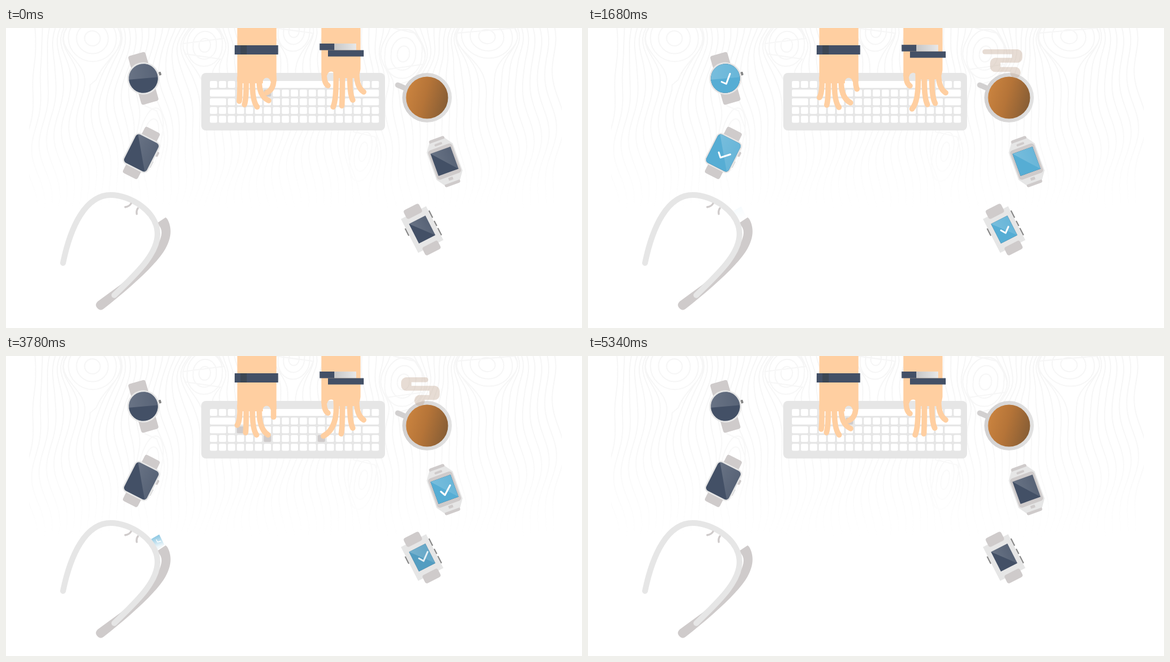
An HTML page that plays this animation: 1000 by 521 pixels, repeating every 5.37 s.

```html
<!DOCTYPE html>
<html lang="en">
<head>
<meta charset="utf-8">
<title>Desk with wearables</title>
<style>
  html, body { margin: 0; width: 100%; height: 100%; overflow: hidden; background: #fff; }
  svg { display: block; width: 100vw; height: 100vh; }
  .strap { fill: #cfcbcb; }
  .case { fill: #e6e6e6; }
  .dark { fill: #435066; }
  .blue { fill: #56add4; }
  .skin { fill: #ffcfa1; }
  .button { fill: #858585; }
  .finger { fill: none; stroke: #ffcfa1; stroke-width: 9.5; stroke-linecap: round; }
  .check { fill: none; stroke: #fff; stroke-width: 3; stroke-linecap: round; stroke-linejoin: round; }
</style>
</head>
<body>
<svg id="stage" viewBox="0 0 1000 521">
  <defs>
    <linearGradient id="coffee" x1="0" y1=".35" x2="1" y2=".65">
      <stop stop-color="#ca833f"/><stop offset=".45" stop-color="#b57438"/><stop offset="1" stop-color="#865d35"/>
    </linearGradient>
    <linearGradient id="rim">
      <stop stop-color="#d2d0d0"/><stop offset="1" stop-color="#e2e2e2"/>
    </linearGradient>
    <linearGradient id="silver">
      <stop stop-color="#c6c6c6"/><stop offset="1" stop-color="#e8e8e8"/>
    </linearGradient>
    <linearGradient id="gloss">
      <stop stop-color="#fff" stop-opacity=".2"/><stop offset="1" stop-color="#fff" stop-opacity=".11"/>
    </linearGradient>
    <linearGradient id="prism" x1=".3" y1="0" x2=".6" y2="1">
      <stop stop-color="#7cc0df"/><stop offset=".8" stop-color="#f0f7fa"/>
    </linearGradient>
    <linearGradient id="fadeDown" x2="0" y2="1">
      <stop stop-color="#fff"/><stop offset=".5" stop-color="#ccc"/><stop offset="1" stop-color="#000"/>
    </linearGradient>
    <mask id="grainMask" maskUnits="userSpaceOnUse" x="40" y="0" width="925" height="315">
      <rect x="40" width="925" height="315" fill="url(#fadeDown)"/>
    </mask>
  </defs>

  <g mask="url(#grainMask)"><path id="grain" fill="none" stroke="#f6f6f6" stroke-width="2"/></g>

  <g id="keyboard"><rect class="case" x="339" y="78" width="319" height="100" rx="8"/></g>

  <path d="M680 99L694 105" stroke="#d2d0d0" stroke-width="9" stroke-linecap="round"/>
  <circle cx="731" cy="121" r="43" fill="url(#rim)"/>
  <circle cx="731" cy="121" r="36.5" fill="url(#coffee)"/>
  <g id="steam" fill="#c5aa96" stroke="#c5aa96"></g>

  <g transform="translate(238.5 87.5) rotate(-16)">
    <rect class="strap" x="-15.5" y="-44" width="31" height="88" rx="4"/>
    <rect class="button" x="28" y="-3" width="4" height="6" rx="1"/>
    <circle class="case" r="28"/>
    <circle class="dark" r="25.3"/><circle class="blue on" r="25.3"/>
    <path d="M-25.3 0A25.3 25.3 0 0 1 25.3 0Z" fill="url(#gloss)" transform="rotate(11)"/>
  </g>

  <g transform="translate(235 217) rotate(27)">
    <rect class="strap" x="-14.5" y="-45" width="29" height="90" rx="4"/>
    <rect class="strap" x="23" y="-15" width="5" height="9" rx="2"/>
    <rect x="24" y="4" width="2" height="12" fill="#dcdcdc"/>
    <rect class="case" x="-24.5" y="-30" width="49" height="60" rx="9"/>
    <rect class="dark" x="-22" y="-27.5" width="44" height="55" rx="6"/>
    <rect class="blue on" x="-22" y="-27.5" width="44" height="55" rx="6"/>
    <path d="M-20 -26.5L20 26.5L22 21V-21Q22 -27.5 16 -27.5H-16Z" fill="url(#gloss)"/>
  </g>

  <g transform="translate(722.5 350) rotate(-27)">
    <g class="button">
      <rect x="23.5" y="-24" width="3" height="14"/><rect x="23.5" y="-4" width="3" height="10"/>
      <rect x="23.5" y="10" width="3" height="14"/><rect x="-26.5" y="-15" width="3" height="14"/>
    </g>
    <rect class="case" x="-24.5" y="-33" width="49" height="66"/>
    <rect class="strap" x="-15" y="-44" width="30" height="17" rx="4"/>
    <rect class="strap" x="-15" y="28" width="30" height="16" rx="4"/>
    <rect class="dark" x="-16" y="-19" width="32" height="38"/>
    <rect class="blue on" x="-16" y="-19" width="32" height="38"/>
    <path d="M-16 -19L16 19V-19Z" fill="url(#gloss)"/>
  </g>

  <g transform="translate(761.5 232) rotate(-20)">
    <rect class="strap" x="-14" y="-43" width="28" height="86" rx="3"/>
    <path class="case" d="M-15 -38H15L24 -25V25L15 38H-15L-24 25V-25Z"/>
    <rect class="strap" x="-22" y="-27" width="44" height="54" rx="5"/>
    <rect class="strap" x="-7" y="-34" width="14" height="4" rx="2"/>
    <rect class="strap" x="-4" y="29" width="8" height="5" rx="1"/>
    <rect class="dark" x="-18.5" y="-21" width="37" height="41"/>
    <rect class="blue on" x="-18.5" y="-21" width="37" height="41"/>
    <path d="M-18.5 -21L18.5 20V-21Z" fill="url(#gloss)"/>
  </g>

  <path class="on" d="M252 318L266 310L275 328L262 337Z" fill="url(#prism)"/>
  <path class="strap" d="M262 339L277 329Q280 330 283 338C288 352 286 366 277 383C262 410 215 452 169 488Q164 492 159 487Q153 481 159 475L200 445C240 410 268 380 270 357Q271 347 262 339Z"/>
  <path d="M99 408C112 345 138 290 182 290C215 290 263 318 263 358C263 395 220 432 188 464" fill="none" stroke="#e6e6e6" stroke-width="10" stroke-linecap="round"/>
  <path d="M217 305Q214 310 207 311M229 313Q226 317 227 323" fill="none" stroke="#cfcbcb" stroke-width="3.4" stroke-linecap="round"/>

  <path class="check" d="M232 93.5L240 97L246.500 79.500"/>
  <path class="check" d="M227 216L230 225L247 219.500"/>
  <path class="check" d="M717 351.500L725 356L732 340"/>
  <path class="check" d="M755 235.500L762 241.500L771 224.500"/>
  <path class="check" d="M261 319L263 323L269 321.500" style="stroke-width:1.3"/>

  <g id="leftFingers"></g>
  <g id="leftHand">
    <path class="skin" d="M401.500 -20V92Q402 96 407 96H446V93A6.500 6.500 0 0 1 459 93H469.500V-20Z"/>
    <rect class="dark" x="397" y="30" width="75.500" height="16"/>
    <rect x="407" y="30" width="11" height="16" fill="#3c4754"/>
  </g>
  <g id="rightFingers"></g>
  <g id="rightHand">
    <path class="skin" d="M547.500 -20V85H558A6.500 6.500 0 0 1 571 85V90H604L614 82L615.500 74V-20Z"/>
    <rect class="dark" x="544.500" y="30" width="26" height="11.500"/>
    <rect x="570" y="30" width="38" height="11.500" fill="url(#silver)"/>
    <rect class="dark" x="559" y="41.500" width="62" height="11"/>
  </g>
</svg>
<script>
const LOOP = 5370;
const $ = id => document.getElementById(id);
const clamp = v => Math.min(1, Math.max(0, v));
const ease = v => { v = clamp(v); return v * v * (3 - 2 * v); };
const ramp = (t, start, length) => ease((t - start) / length);
const mix = (a, b, k) => a + (b - a) * k;

function add(parent, tag, attrs) {
  const el = document.createElementNS('http://www.w3.org/2000/svg', tag);
  for (const name in attrs) el.setAttribute(name, attrs[name]);
  return parent.appendChild(el);
}

// Wood grain: wavy lines that part around a few knots, with rings inside each knot.
function drawGrain() {
  const knots = [[150, 18, 52, 50], [345, 30, 38, 42], [500, 5, 34, 40], [690, 45, 40, 48], [835, 15, 55, 46], [250, 195, 24, 60], [620, 215, 26, 55]];
  let d = '';
  for (let x0 = 45; x0 < 960; x0 += 13) {
    for (let y = 0; y <= 315; y += 9) {
      let x = x0 + 9 * Math.sin(y / 48 + x0 / 90) + 5 * Math.sin(y / 23 + x0 / 37);
      for (const [kx, ky, r, h] of knots) {
        const dx = x - kx, push = r * Math.exp(-(((y - ky) / h) ** 2));
        x = kx + Math.sign(dx || 1) * Math.sqrt(dx * dx + push * push * Math.exp(-Math.abs(dx) / 90));
      }
      d += (y ? 'L' : 'M') + x.toFixed(1) + ' ' + y;
    }
  }
  for (const [kx, ky, r, h] of knots)
    for (let s = 0.8; s > 0.15; s -= 0.27) {
      const rx = r * s, ry = h * s;
      d += `M${kx - rx} ${ky}a${rx} ${ry} 12 1 0 ${2 * rx} 0a${rx} ${ry} 12 1 0 ${-2 * rx} 0`;
    }
  $('grain').setAttribute('d', d);
}

const keys = {};
function drawKeys() {
  const ones = n => Array(n).fill(1);
  const rows = [[...ones(4), 9, ...ones(6)], [3, ...ones(13), 3], [2, ...ones(15), 2], ones(19), ones(19)];
  rows.forEach((spans, row) => {
    let col = 0;
    for (const span of spans) {
      keys[col + ',' + row] = add($('keyboard'), 'rect', {
        x: 354 + col * 15.6, y: 92 + row * 15.1, width: span * 15.6 - 3, height: 12, rx: 2
      });
      col += span;
    }
  });
}

// Each pose: vertical shift, pressed keys, then the five fingertips.
const hands = [
  {
    name: 'left', base: [[406, 86], [417, 86], [428, 86], [440, 86], [464.5, 84]],
    poses: [
      [0, ['6,1'], 405, 127, 414, 133, 436, 137, 456, 126, 453, 112],
      [0, ['3,2'], 403, 118, 410.500, 133, 436, 137, 456, 128, 464.500, 106],
      [0, ['3,2'], 402, 121, 414, 134, 436, 138, 456, 127, 468, 106],
      [6, [], 405, 133, 415, 138, 437, 147, 456, 138, 468, 112],
      [0, ['3,2', '6,3'], 401.500, 120, 416, 133, 435, 137, 455, 137, 464.500, 106],
      [0, ['5,1', '7,1'], 401.500, 129, 414, 133, 437, 122, 466, 122, 464.500, 106]
    ]
  },
  {
    name: 'right', base: [[552.5, 80], [573, 80], [584, 80], [597, 78], [609, 74]],
    poses: [
      [-3, [], 559, 100, 568, 137, 583, 135, 602, 125, 621, 111],
      [0, ['16,4', '17,2'], 559, 101, 567, 141, 583, 137, 606, 145, 625, 127],
      [0, ['15,2'], 559, 101, 567, 141, 592, 132, 603, 133, 621, 113],
      [-3, ['15,3'], 559, 98, 567, 138, 593, 139, 602, 125, 621, 111],
      [-3, ['12,3'], 559, 99, 551, 139, 582, 135, 602, 125, 621, 111],
      [0, ['16,4'], 559, 101, 567, 141, 582, 141, 606, 145, 621, 113]
    ]
  }
];

// Fixed beats, filled in with extra strokes at typing speed.
function typingBeats() {
  const main = [[0, 0], [1050, 1], [2340, 2], [3240, 3], [3780, 4], [4770, 5], [LOOP, 0]];
  const beats = [];
  main.slice(0, -1).forEach(([start, pose], i) => {
    const end = main[i + 1][0], count = Math.round((end - start) / 180);
    for (let k = 0; k < count; k++)
      beats.push([start + (end - start) * k / count, k ? (pose + k * 2 + i) % 6 : pose]);
  });
  return [...beats, [LOOP, 0]];
}
const beats = typingBeats();

function drawHands(t) {
  const i = beats.findIndex(b => b[0] > t) - 1;
  const [t0, p0] = beats[i], [t1, p1] = beats[i + 1];
  const phase = (t - t0) / (t1 - t0), k = ease((phase - 0.25) / 0.5);
  for (const key in keys) keys[key].style.fill = '#fff';
  for (const hand of hands) {
    const a = hand.poses[p0], b = hand.poses[p1];
    const shift = mix(a[0], b[0], k);
    $(hand.name + 'Hand').setAttribute('transform', `translate(0 ${shift})`);
    hand.fingers.forEach((finger, n) => {
      const [x, y0] = hand.base[n], y = y0 + shift;
      const tipX = mix(a[2 + n * 2], b[2 + n * 2], k), tipY = mix(a[3 + n * 2], b[3 + n * 2], k);
      finger.setAttribute('d', `M${x} ${y}Q${x - 0.17 * (tipX - x)} ${mix(y, tipY, 0.78)} ${tipX} ${tipY}`);
    });
    const pressed = phase < 0.32 ? a[1] : phase > 0.68 ? b[1] : [];
    for (const key of pressed) keys[key].style.fill = '#cfcbcb';
  }
}

const screens = document.querySelectorAll('.on');
const checks = document.querySelectorAll('.check');
function drawScreens(t) {
  screens.forEach((screen, i) => {
    const lit = ramp(t, 440 + i * 300, 250) * (1 - ramp(t, 3120 + i * 295, 270));
    const drawn = ramp(t, 950 + i * 270, 270);
    screen.style.opacity = lit;
    checks[i].style.opacity = drawn > 0.01 ? lit : 0;
    checks[i].style.strokeDashoffset = 1 - drawn;
  });
}

// Steam: three bars joined by thick bends; the second puff mirrors the first.
const bars = [41.3, 56, 72].map(y => add($('steam'), 'line', { y1: y, y2: y, 'stroke-width': 8.5, 'stroke-linecap': 'round' }));
const bends = [[37, 23.300], [51.800, 24.500], [67.800, 19]].map(([y, height]) => add($('steam'), 'rect', { y, height, width: 18, rx: 9, stroke: 'none' }));
function drawSteam(t) {
  const first = t < 2700, side = first ? 1 : -1;
  const k = first ? (t - 1050) / 1290 : (t - 3780) / 990;
  const edges = first
    ? [mix(698, 671, k), mix(760, 748, k), mix(702, 694, k), mix(752, 750, k)]
    : [mix(733, 725, k), mix(686, 678, k), mix(753, 756, k), mix(709, 703, k)];
  const facing = [-side, side, -side, side];
  const inner = edges.map((x, i) => x - facing[i] * (i ? 9 : 4.25));
  bars.forEach((bar, i) => {
    bar.setAttribute('x1', inner[i]);
    bar.setAttribute('x2', inner[i + 1]);
  });
  bends.forEach((bend, i) => bend.setAttribute('x', edges[i + 1] - (facing[i + 1] > 0 ? 18 : 0)));
  const shown = first
    ? ramp(t, 350, 550) * (1 - ramp(t, 1700, 750))
    : ramp(t, 2880, 750) * (1 - ramp(t, 4790, 450));
  $('steam').style.opacity = 0.4 * shown;
}

function render(now) {
  const t = now % LOOP;
  drawHands(t);
  drawScreens(t);
  drawSteam(t);
}

drawGrain();
drawKeys();
for (const hand of hands)
  hand.fingers = hand.base.map(() => add($(hand.name + 'Fingers'), 'path', { class: 'finger' }));
checks.forEach(check => {
  check.setAttribute('pathLength', 1);
  check.style.strokeDasharray = '1 2';
});

const start = performance.now();
function tick() {
  render(performance.now() - start);
  requestAnimationFrame(tick);
}
tick();
</script>
</body>
</html>
```
